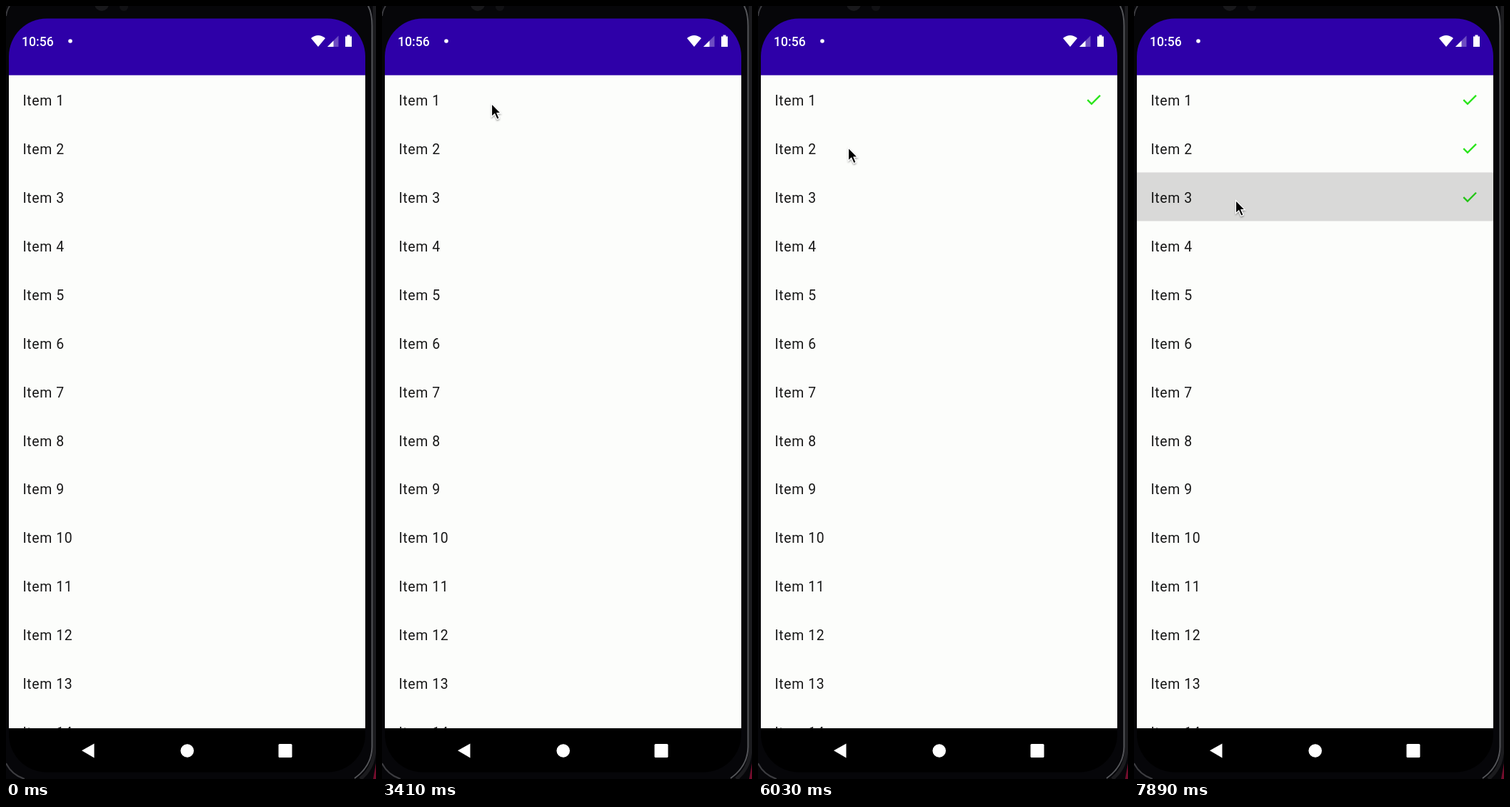
These frames come from a looping animation (518x1080 px, 7.99 s). An HTML page:

```html
<!DOCTYPE html>
<html lang="en">
<head>
<meta charset="utf-8">
<title>Selectable list</title>
<style>
  html, body { margin: 0; width: 100%; height: 100%; overflow: hidden; background: #060609; }
  svg { display: block; width: 518px; height: 1080px; }
  text { font-family: Roboto, sans-serif; }
  #rows text { font-size: 19.42px; letter-spacing: .61px; fill: #181818; }
  .check { fill: none; stroke: #2be51c; stroke-width: 2.4; }
</style>
</head>
<body>
<svg viewBox="0 0 518 1080">
  <defs>
    <clipPath id="screen"><rect x="4" y="17.5" width="499" height="1053" rx="53"/></clipPath>
    <clipPath id="list"><rect x="4" y="96.7" width="499" height="912.6"/></clipPath>
    <clipPath id="rowClip"><rect id="rowBox" x="4" width="499" height="67.9"/></clipPath>
    <filter id="shadow" x="-50%" y="-50%" width="200%" height="200%">
      <feDropShadow dx="0" dy="1.5" stdDeviation="1.2" flood-opacity=".4"/>
    </filter>
  </defs>

  <!-- phone body -->
  <rect width="518" height="1080" fill="#060609"/>
  <circle cx="134" cy="-3" r="10" fill="#18181b"/>
  <circle cx="165" cy="1" r="6" fill="#111114"/>
  <path d="M514 1080L518 1058V1080Z" fill="#720d2c"/>
  <g fill="none">
    <path d="M516 0V1035Q516 1064 496 1080" stroke="#1b1b1e" stroke-width="5"/>
    <path d="M507 0Q512.500 10 512.500 28V1035Q512 1062 488 1079" stroke="#55565a" stroke-width="2"/>
    <path d="M0 14Q1 6 5 0M0 1058Q8 1074 26 1080" stroke="#3c3c40" stroke-width="2"/>
  </g>

  <g clip-path="url(#screen)">
    <rect y="17" width="518" height="80" fill="#2e00a8"/>
    <rect y="96.700" width="518" height="912.600" fill="#fcfdfb"/>
    <rect y="1009.300" width="518" height="70" fill="#000"/>
  </g>

  <!-- status bar and navigation -->
  <g fill="#fff">
    <text x="22" y="56" font-size="17.600" font-weight="500">10:56</text>
    <circle cx="90" cy="49" r="2.800"/>
    <path d="M427 45Q437 37 447 45L437 57Z"/>
    <path d="M450 57L465.500 41.500V57Z" opacity=".3"/>
    <path d="M450 57L458.500 48.500V57Z"/>
    <path d="M475 42.500H477.500V40.500H481.500V42.500H484V57H475Z"/>
    <path d="M106 1040.300L123.500 1030.500V1050.500Z"/>
    <circle cx="253.700" cy="1040.500" r="9.300"/>
    <rect x="381.500" y="1031" width="19" height="19" rx="1.500"/>
  </g>

  <g clip-path="url(#list)">
    <g id="rows"></g>
    <g clip-path="url(#rowClip)"><circle id="ripple" fill="#000"/></g>
  </g>

  <path id="cursor" d="M.5 .5V18.700L4.700 14.800L8 22.300L11.200 20.900L8 13.600H13.300Z"
    fill="#000" stroke="#fff" stroke-width="1.200" filter="url(#shadow)"/>
</svg>
<script>
const LOOP = 7990, TOP = 96.7, ROW = 67.93;
const $ = id => document.getElementById(id);
const rowTop = i => TOP + i * ROW;
const clamp = v => Math.min(1, Math.max(0, v));
const smooth = v => v * v * (3 - 2 * v);

const taps = [3960, 6270, 7650];
const start = [518, 250];
// begin, end, x, y of each pointer move
const moves = [
  [690, 1350, 125.5, 127.5],
  [1650, 2150, 153, 136],
  [4800, 5500, 126, 197.5],
  [6750, 7100, 142, 271]
];

$('rows').innerHTML = Array.from({ length: 14 }, (_, i) =>
  `<text x="23.4" y="${rowTop(i) + 42.3}">Item ${i + 1}</text>`).join('') +
  taps.map((_, i) =>
    `<path class="check" d="M461.300 ${rowTop(i) + 34.5}l5.700 5.700l12 -12"/>`).join('');
const checks = document.querySelectorAll('.check');

function pointer(t) {
  let [x, y] = start;
  for (const [a, b, tx, ty] of moves) {
    const k = smooth(clamp((t - a) / (b - a)));
    x += (tx - x) * k;
    y += (ty - y) * k;
  }
  return [x, y];
}

function draw(t) {
  const [x, y] = pointer(t);
  $('cursor').setAttribute('transform', `translate(${x} ${y})`);
  $('cursor').style.display = t < moves[0][0] ? 'none' : '';

  checks.forEach((c, i) => c.style.display = t >= taps[i] ? '' : 'none');

  const row = taps.filter(tap => t >= tap).length - 1;
  const age = row < 0 ? 1e4 : t - taps[row];
  const [cx, cy] = pointer(taps[Math.max(row, 0)]);
  const ripple = $('ripple');
  $('rowBox').setAttribute('y', rowTop(Math.max(row, 0)));
  ripple.setAttribute('cx', cx);
  ripple.setAttribute('cy', cy);
  ripple.setAttribute('r', 400 * (1 - (1 - clamp(age / 225)) ** 1.75));
  ripple.setAttribute('opacity', .14 * clamp(age / 75) * (1 - clamp((age - 270) / 150)));
}

function tick() {
  draw(performance.now() % LOOP);
  requestAnimationFrame(tick);
}
tick();
</script>
</body>
</html>
```
